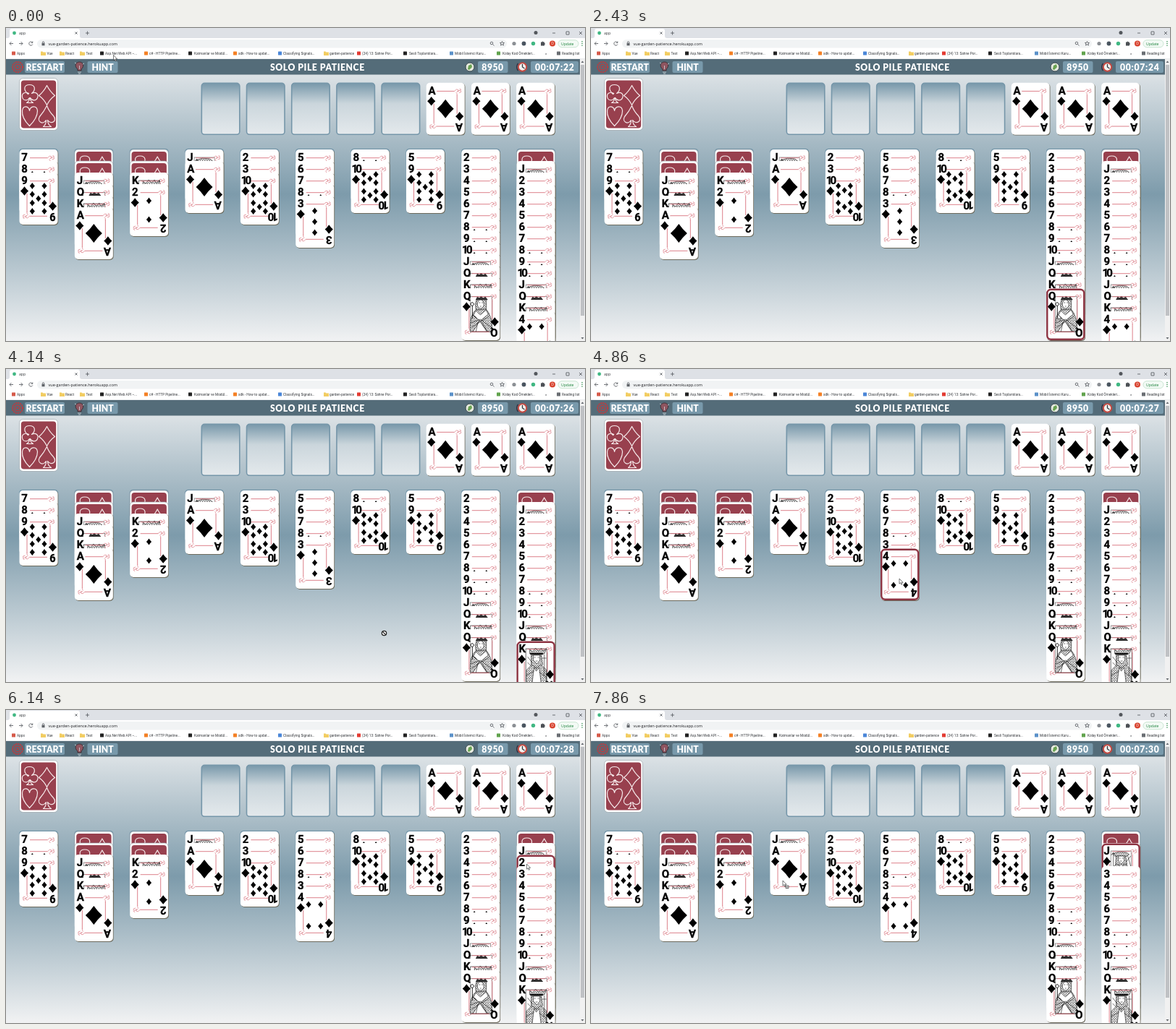
An HTML page that plays this animation: 800 px wide and 433 px high, repeating every 8000 ms.

```html
<!DOCTYPE html>
<html lang="en">
<head>
<meta charset="utf-8">
<title>app</title>
<style>
  html, body { margin: 0; width: 100%; height: 100%; overflow: hidden; }
  svg { display: block; width: 800px; height: 433px; }
  text { white-space: pre; }
  .ui { font: 5.1px "Open Sans", sans-serif; fill: #33363a; }
  .url { font-size: 5.55px; fill: #202124; }
  #marks { font: 4.75px Roboto, sans-serif; }
  .bar { font: 900 12.2px Lato, sans-serif; fill: #fff; text-anchor: middle; }
  .rank { font: 700 15px Roboto, sans-serif; fill: #000; stroke: #000; stroke-width: .3; }
  .ten { letter-spacing: -2.7px; }
  .line { fill: none; stroke: #d4606c; stroke-width: .8; }
  .ink { fill: #fff; stroke: #111; stroke-width: .6; }
  .icon { fill: none; stroke: #5f6368; stroke-width: .9; }
</style>
</head>
<body>
<svg viewBox="0 0 800 433" xmlns="http://www.w3.org/2000/svg">
  <defs>
    <linearGradient id="felt" x2="0" y2="1">
      <stop stop-color="#e8ebed"/><stop offset=".48" stop-color="#7d9bab"/><stop offset="1" stop-color="#f1f2f3"/>
    </linearGradient>
    <linearGradient id="well" x2="0" y2="1">
      <stop stop-color="#7898aa"/><stop offset=".4" stop-color="#cbd6dc"/><stop offset="1" stop-color="#e4e9ec"/>
    </linearGradient>
    <pattern id="weave" width="3.2" height="3.4" patternUnits="userSpaceOnUse">
      <rect width="3.2" height="3.4" fill="#fff"/>
      <path d="M0 0L3.2 3.4M3.2 0L0 3.4M1.6 0V1.4" stroke="#111" stroke-width=".4"/>
    </pattern>
    <g id="trim" class="line">
      <path d="M14.5 11.7H39M42.5 17V43"/>
      <path d="M39 11.7q3-4 5-2t-2 3M43 12.5q4-3 5-1t-3 2.5M41 13.5q2 1 1.5 4M46 8.5q2 0 2 2" stroke-width=".6"/>
    </g>
    <g id="Q" class="ink">
      <rect x="12" y="11.500" width="30" height="49" stroke-width=".4"/>
      <path d="M20 30q-2-8 1-15 6-4 13 1 1 7 0 14z" fill="url(#weave)"/>
      <path d="M20 16l2-4 3 2 2-3 3 3 3-2 3 4z" fill="#333"/>
      <path d="M20 30Q11 36 12 60H42Q43 38 34 29Z" fill="url(#weave)"/>
      <path d="M20 31l6 6 8-7 3 6-11 9-10-7zM25 45l10 15H16z"/>
      <ellipse cx="26.500" cy="22" rx="4.500" ry="6"/>
      <path d="M24 20h2m2 0h2M25.500 25h2M13 48l13-5 15 11M14 54l24-15M23 46l-3 14M28 47l8 13" fill="none"/>
      <path d="M15 24v18M12.500 22q2-5 5 0-3 5-5 0M15 36l6 5" stroke-width=".9"/>
    </g>
    <g id="K" class="ink">
      <rect x="12.5" y="11" width="29" height="50"/>
      <path d="M18 18V12l4 3 4-5 4 4 4-4 2 4 5-3-3 7z" fill="url(#weave)"/>
      <path d="M19 17h17v2H19z" fill="#111"/>
      <path d="M20 20h14l2 13-8 5-8-5z" fill="url(#weave)"/>
      <path d="M23 20h9v7l-4 5-5-5z"/>
      <path d="M24 23h2m3 0h2M26 28h3" fill="none"/>
      <path d="M21 33l-8 8v20h28V40l-8-7-6 5z" fill="url(#weave)"/>
      <path d="M24 37l3 5 4-5 3 24H21zM38 19v29M35 24h6M13 48l11-6M41 51l-10-8M15 22l7 9M15 30l6 6"/>
    </g>
    <g id="J" class="ink">
      <rect x="12.5" y="11" width="28" height="50" stroke-width=".4"/>
      <path d="M15 15l9-3 10 1 4 3-5 3H19z" fill="url(#weave)"/>
      <path d="M20 18h13l2 12H19z" fill="url(#weave)"/>
      <path d="M23 18h8v7l-4 4-4-4z"/>
      <path d="M24 21h2m2 0h2M25 25h3M16 14v24M13 17l3-4 3 4M36 18l4 14M34 26l6-8" fill="none"/>
      <path d="M21 29l-8 6v26h27V35l-8-6-5 4z" fill="url(#weave)"/>
      <path d="M24 33h6v28h-6zM13 44l11-5M40 47l-10-7"/>
    </g>
    <g id="back">
      <rect width="53" height="72" rx="5" fill="#fff" stroke="#8f9ba2" stroke-width=".6"/>
      <rect x="2.3" y="3" width="48.4" height="66" rx="4" fill="#98404e"/>
      <g fill="none" stroke="#f6e9ea" stroke-width="1.2" stroke-linejoin="round">
        <path d="M12 22c-7-6-6-13 2-13s9 7 3 12c6-3 10 1 8 6s-8 4-10 0q0 5 4 7H10q4-2 4-7c-3 5-9 4-10-1s4-8 9-5z"/>
        <path d="M38 10q4 8 11 14-7 5-11 13-4-8-11-13 7-6 11-14z"/>
        <path d="M14 66Q3 55 4 45c1-8 9-7 10 0 1-7 10-8 11 0q0 10-11 21z"/>
        <path d="M38 38q3 8 9 14c6 7-3 13-8 6q0 6 5 9H33q4-3 4-9c-5 7-13 2-9-5q6-7 10-15z"/>
      </g>
    </g>
    <path id="arrow" d="M0 0V7.200L1.700 5.700 2.800 8.300 4 7.800 2.900 5.300H5.100Z" fill="#fff" stroke="#222" stroke-width=".6"/>
    <g id="move"><use href="#arrow"/><path d="M4 7h4v3.5H4zM5 8.8h2" fill="#fff" stroke="#222" stroke-width=".7"/></g>
    <g id="deny" fill="#fff" stroke="#222" stroke-width="1.2"><circle r="3.2" cx=".5" cy=".5"/><path d="M-1.7-1.7L2.7 2.7"/></g>
  </defs>

  <rect width="800" height="433" fill="#fff"/>
  <rect y="43" width="793" height="390" fill="url(#felt)"/>

  <g class="ui">
    <rect width="800" height="14" fill="#dee1e6"/>
    <path d="M2 14q3 0 3-3V4q0-3 3-3h91q3 0 3 3v7q0 3 3 3z" fill="#fff"/>
    <circle cx="11.5" cy="7" r="2.4" fill="#41b883"/>
    <text x="18" y="9">app</text>
    <path class="icon" d="M95.500 5.500l3 3m0-3l-3 3M110 7h5m-2.500-2.500v5M755 7h4M774 5h4v4h-4zM792 5l4 4m0-4l-4 4"/>
    <circle cx="732" cy="6.500" r="2.500" fill="#53575c"/>
    <path class="icon" d="M10 21.500H5l2.300-2.400M5 21.500l2.300 2.400M18 21.500h5l-2.300-2.400M23 21.500l-2.300 2.400M36.500 20a2.600 2.600 0 1 0 .3 2.500m0-4v2h-2"/>
    <rect x="43" y="16" width="649" height="11.500" rx="5.700" fill="#f1f3f4"/>
    <path d="M49.500 21h4v3.300h-4z" fill="#5f6368"/><path class="icon" d="M50.300 21v-1a1.200 1.200 0 0 1 2.400 0v1"/>
    <text class="url" x="58.500" y="23.700">vue-garden-patience.herokuapp.com</text>
    <circle class="icon" cx="671" cy="21" r="1.800"/><path class="icon" d="M672.500 22.500l2 2"/>
    <path class="icon" d="M685.500 18.500l1 2h2l-1.600 1.400.6 2.100-2-1.200-2 1.200.6-2.100-1.600-1.400h2z"/>
    <circle cx="702" cy="21.500" r="2.600" fill="#8b8f94"/>
    <circle cx="715.500" cy="21.500" r="2.900" fill="#4a5560"/>
    <circle cx="728.500" cy="21.500" r="2.700" fill="#41b883"/>
    <path d="M739 19.500h1.500q1-2 2 0h1.500v1.500q2 1 0 2v1.500h-5z" fill="#4c5055"/>
    <circle cx="755" cy="21.500" r="4" fill="#d8432f"/><text x="755" y="23.400" text-anchor="middle" fill="#fff">D</text>
    <rect x="763" y="16.700" width="28" height="10" rx="5" fill="#f3faf5" stroke="#b6dcc2" stroke-width=".7"/>
    <text x="767" y="23.500" fill="#188038">Update</text>
    <path d="M796 18v1.200m0 1.600v1.200m0 1.600v1.200" stroke="#188038" stroke-width="1.200"/>
    <g id="marks"></g>
    <path d="M0 42.700H800" stroke="#d5d8dc" stroke-width=".6"/>
  </g>

  <rect y="43" width="793" height="21.500" fill="#546c79"/>
  <g fill="#7899ab">
    <rect x="26" y="46" width="55" height="16" rx="2"/><rect x="112.500" y="46" width="42" height="16" rx="2"/>
    <rect x="652" y="46" width="41.500" height="16" rx="2"/><rect x="725" y="46" width="66" height="16" rx="2"/>
  </g>
  <g fill="none" stroke="#bd3b3f">
    <circle cx="16" cy="54" r="7" stroke-width="2" stroke-dasharray="2 1"/>
    <circle cx="16" cy="54" r="3.800" stroke-width="1.300"/>
    <circle cx="16" cy="54" r="1" fill="#bd3b3f"/>
  </g>
  <path d="M99 57c-5-4-3-10 2.500-10s7 6 2.500 10v2h-5z" fill="#8f5560" stroke="#3d3037"/>
  <path d="M99 61h5M100 63h3M95 48l2 1m9 1l2-1M101.500 57v-5" stroke="#d5dce0" stroke-width=".8"/>
  <circle cx="641" cy="54" r="6" fill="#e5e9df" stroke="#3c4b50"/>
  <path d="M638 57l1-5 4-2 1 4-4 4z" fill="#6aa252"/>
  <circle cx="713.500" cy="54" r="5.700" fill="#f4f1ed" stroke="#c64a42" stroke-width="2"/>
  <path d="M713.500 50v4l3 2" fill="none" stroke="#303a42" stroke-width="1.300"/>
  <path d="M707.500 49a8 8 0 0 0 0 10" fill="none" stroke="#334" stroke-width="1.500"/>
  <g class="bar">
    <text x="53.700" y="58.500">RESTART</text><text x="133.500" y="58.500">HINT</text>
    <text x="430.300" y="58.500" style="letter-spacing:.55px">SOLO PILE PATIENCE</text>
    <text x="672.500" y="58.500" style="letter-spacing:.5px">8950</text>
    <text id="clock" x="758.300" y="58.500" style="letter-spacing:.7px"></text>
  </g>

  <g id="top"></g>
  <g id="table"></g>

  <rect x="793" y="43" width="7" height="390" fill="#f1f1f1"/>
  <rect x="794" y="51" width="5" height="347" fill="#bfc1c4"/>
  <path d="M794.500 48l2-2.500 2 2.500zM794.500 428l2 2.500 2-2.500z" fill="#62666b"/>
  <use id="pointer"/>
</svg>
<script>
const $ = id => document.getElementById(id);
const CARD_W = 53, CARD_H = 72, STEP = 16, TABLE_Y = 168, LOOP = 8000, FRAME = 1000 / 7;
const colX = i => 18.5 + i * 76.35;
const topX = i => 270 + i * 62.2;

const pair = (...ys) => ys.flatMap(y => [[17.8, y], [34.5, y]]);
const mid = (...ys) => ys.map(y => [26.3, y]);
const pips = {
  2: mid(23, 49), 3: mid(21, 36, 51), 4: pair(21, 51),
  5: [...pair(21, 51), ...mid(36)], 6: pair(21, 36, 51),
  7: [...pair(21, 36, 51), ...mid(28.5)],
  8: [...pair(18.5, 36, 53.5), ...mid(27, 45)],
  9: [...pair(18.5, 30, 42, 53.5), ...mid(36)],
  10: [...pair(18.5, 30, 42, 53.5), ...mid(24.5, 47.5)]
};

const diamond = (x, y, w, h) =>
  `<path d="M${x} ${y - h}Q${x + w * .44} ${y - h * .44} ${x + w} ${y}Q${x + w * .44} ${y + h * .44} ${x} ${y + h}` +
  `Q${x - w * .44} ${y + h * .44} ${x - w} ${y}Q${x - w * .44} ${y - h * .44} ${x} ${y - h}Z"/>`;

function face(rank) {
  const ten = rank === '10';
  const corner = `<use href="#trim"/><text class="rank${ten ? ' ten' : ''}" x="${ten ? .8 : 2.8}" y="16">${rank}</text>` +
    diamond(7, 25.5, 5.6, 6.3);
  const art = rank === 'A' ? diamond(26.5, 36, 11.5, 13)
    : pips[rank] ? pips[rank].map(([x, y]) => diamond(x, y, 3.6, 4.5)).join('')
    : `<use href="#${rank}"/>`;
  return `<rect x=".8" y=".9" width="${CARD_W}" height="${CARD_H}" rx="5" fill="#6d6a5c"/>` +
    `<rect width="${CARD_W}" height="${CARD_H}" rx="5" fill="#fff"/>` +
    `${art}${corner}<g transform="rotate(180 26.5 36)">${corner}</g>`;
}

function card(rank, x, y, hot) {
  const body = rank === '#' ? '<use href="#back"/>' : face(rank);
  const ring = hot ? '<rect x="1" y="1.800" width="51" height="69" rx="5" fill="none" stroke="#8d3342" stroke-width="2.400"/>' : '';
  return `<g transform="translate(${x} ${y})">${body}${ring}</g>`;
}

const well = (x, y) => `<rect x="${x}" y="${y}" width="52.5" height="71" rx="4" fill="url(#well)" stroke="#7596a9" stroke-width="1.6"/>`;

const deal = ('7 8 9|# # J Q K A|# # K 2|J A|2 3 10|5 6 7 8 3|8 10|5 9|' +
  '2 3 4 5 6 7 8 9 10 J Q K Q|# J 2 3 4 5 6 7 8 9 10 J Q K 4').split('|').map(c => c.split(' '));

// Two drags out of the last column; the first one lands on the sixth.
const drags = [{ from: 3220, to: 4700, row: 14 }, { from: 6500, to: LOOP, row: 2 }];

const route = [
  [0, 148.5, 37.5], [140, 200, 140], [290, 385, 345], [570, 385, 345], [1430, 404, 363], [1860, 404, 363],
  [2720, 732.5, 408], [3150, 732.5, 408], [4140, 522, 365], [4570, 426, 296], [4860, 426, 290],
  [5290, 551.5, 267], [5430, 551.5, 267], [6000, 719.5, 213], [6500, 719.5, 213], [7600, 265, 236], [LOOP, 265, 236]
];

function pointerAt(t) {
  const i = Math.max(1, route.findIndex(p => p[0] >= t));
  const [t0, x0, y0] = route[i - 1], [t1, x1, y1] = route[i];
  const u = (t - t0) / (t1 - t0), e = u * u * (3 - 2 * u);
  return [x0 + (x1 - x0) * e, y0 + (y1 - y0) * e];
}

const heightOf = cards => (cards.length - 1) * STEP + CARD_H;
const columnAt = (cols, px, py) => cols.findIndex((c, i) =>
  px >= colX(i) && px <= colX(i) + CARD_W && py >= TABLE_Y && py <= TABLE_Y + heightOf(c));

let shown = '';
function drawTable(cols, hotCol, hotRow) {
  const key = JSON.stringify([cols, hotCol, hotRow]);
  if (key === shown) return;
  shown = key;
  $('table').innerHTML = cols.map((cards, c) => well(colX(c) + .3, TABLE_Y - .5) + cards.map((rank, r) =>
    rank ? card(rank, colX(c), TABLE_Y + r * STEP, c === hotCol && r === hotRow) : '').join('')).join('');
}

function render(t) {
  const [px, py] = pointerAt(t);
  const cols = deal.map(c => [...c]);
  if (t >= drags[0].to) cols[5].push(cols[9].pop());
  const drag = drags.find(d => t >= d.from && t < d.to);
  const over = columnAt(cols, px, py);
  let hotCol = over, hotRow = -1;
  if (drag) {
    cols[9][drag.row] = null;
    hotCol = 9;
    hotRow = drag.row - 1;
  } else if (over >= 0) {
    hotRow = Math.min(cols[over].length - 1, Math.floor((py - TABLE_Y) / STEP));
    if (cols[over][hotRow] === '#') hotRow = -1;
  }
  drawTable(cols, hotCol, hotRow);
  $('clock').textContent = '00:07:' + (22 + Math.floor((t + 430) / 1000));
  $('pointer').setAttribute('href', !drag ? '#arrow' : over >= 0 ? '#move' : '#deny');
  $('pointer').setAttribute('transform', `translate(${px} ${py})`);
}

const folder = '#f2cd62';
$('marks').innerHTML = [
  [8, 15, 'Apps', '#d65a4a'], [49, 56.5, 'Vue', folder], [75, 82, 'React', folder], [103, 110.5, 'Test', folder],
  [130, 137, 'Asp.Net Web API –...', '#222'], [191, 198, 'c# - HTTP Pipeline...', '#f48024'],
  [252, 260, 'Katmanlar ve Modül...', '#222'], [314, 321, 'sdk - How to updat...', '#f48024'],
  [376, 383, 'Classifying Signals...', '#4a86d8'], [440, 447, 'garden-patience', folder],
  [485, 492, '(24) 13: Sahne Por...', '#e33b32'], [549, 557, 'Sesli Toplantılara...', '#222'],
  [613, 620, 'Mobil İstemci Kuru...', '#5b91c9'], [678, 686, 'Kolay Kod Örnekleri...', '#61a34d'],
  [761, 768, 'Reading list', '#6a6e73']
].map(([ix, x, label, color]) => (color === folder
  ? `<path d="M${ix - 1} 32.500h2.500l1 1h3.500v4.500h-7z" fill="${color}"/>`
  : `<rect x="${ix}" y="32.500" width="5" height="5" rx=".6" fill="${color}"/>`) +
  `<text x="${x}" y="37">${label}</text>`).join('') + '<text x="745" y="37">»</text>';

$('top').innerHTML = card('#', 18.5, 69.5) +
  [0, 1, 2, 3, 4].map(i => well(topX(i) + .3, 76.3)).join('') +
  [5, 6, 7].map(i => card('A', topX(i) - .3, 75.7)).join('');

const start = performance.now();
function tick() {
  const t = (performance.now() - start) % LOOP;
  render(Math.min(LOOP - 1, Math.floor((t + 5) / FRAME) * FRAME));
  requestAnimationFrame(tick);
}
tick();
</script>
</body>
</html>
```
